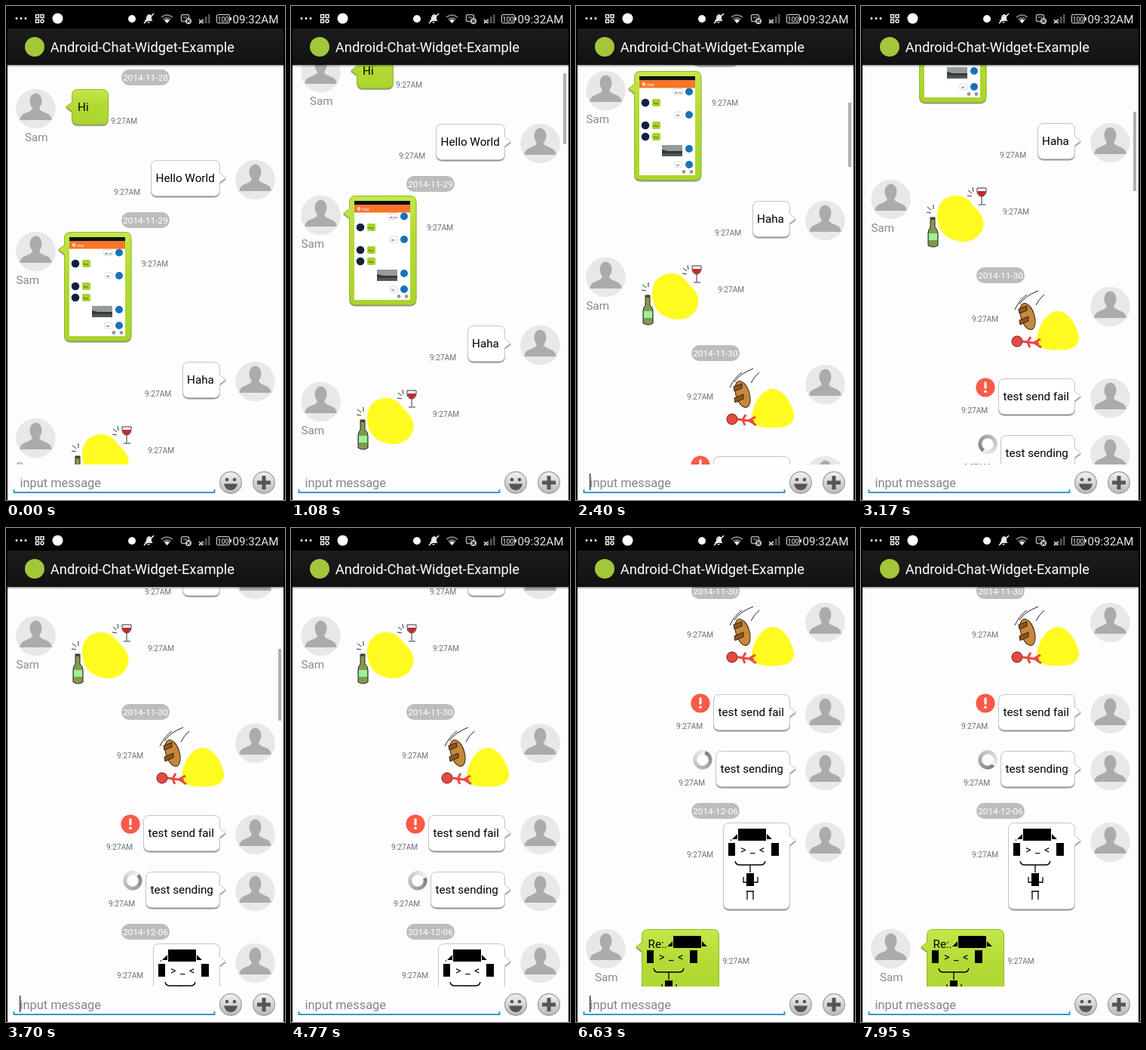
These frames come from a looping animation (370 px wide and 654 px high, 8 s). An HTML page:

```html
<!DOCTYPE html>
<html lang="en">
<head>
<meta charset="utf-8">
<title>Chat list</title>
<style>
html, body { margin: 0; width: 100%; height: 100%; overflow: hidden; background: #000; }
svg { display: block; font-family: Roboto, sans-serif; }
</style>
</head>
<body>
<svg id="stage" width="370" height="654" viewBox="0 0 370 654"></svg>
<script>
const LOOP = 8000;
// The screen refreshes at these moments only.
const STEPS = [0, 280, 540, 810, 1080, 1330, 1610, 1880, 2130, 2400, 2650, 2920, 3170, 3450, 3700, 3970,
  4220, 4500, 4770, 5020, 5270, 5550, 5830, 6080, 6360, 6630, 6900, 7150, 7420, 7700, 7950];
// time, scroll offset, scrollbar top, scrollbar height
const SCROLL = [
  [0, 0, 79, 94], [540, 0, 79, 94], [1610, 96, 99, 93], [2400, 213, 128, 85], [3170, 316, 140, 105],
  [3700, 429, 160, 95], [4770, 429, 160, 95], [5550, 589, 193, 95], [LOOP, 589, 193, 95]
];

const text = (x, y, s, size, fill, extra = '') =>
  `<text x="${x}" y="${y}" font-size="${size}" fill="${fill}" ${extra}>${s}</text>`;
const rect = (x, y, w, h, fill, r = 0) =>
  `<rect x="${x}" y="${y}" width="${w}" height="${h}" rx="${r}" fill="${fill}"/>`;
const circle = (x, y, r, fill, extra = '') => `<circle cx="${x}" cy="${y}" r="${r}" fill="${fill}" ${extra}/>`;
const line = (d, color = '#111', width = 1.2) =>
  `<path d="${d}" fill="none" stroke="${color}" stroke-width="${width}"/>`;
const shape = (d, fill) => `<path d="${d}" fill="${fill}"/>`;
const at = (x, y, body) => `<g transform="translate(${x} ${y})">${body}</g>`;

const date = (y, s) => rect(153, y - 10, 64, 21, '#bdbdbd', 10.5) +
  text(185, y + 4.5, s, 11.8, '#fff', 'text-anchor="middle"');
const stamp = (x, y) => text(x, y + 46, '9:27AM', 10.2, '#68707e');
const label = (x, y, s) => text(x, y + 29, s, 15.25, '#000');
const avatar = (x, y) => at(x, y + 26,
  circle(0, 0, 26.3, '#e8e8e8') +
  '<ellipse cy="-10" rx="8" ry="10.5" fill="#ababab"/>' +
  shape('M-5-4h10v5q2 2 8 4.5q8 2.5 8 9.5H-21q0-7 8-9.5q6-2.5 8-4.5z', '#ababab'));
const mine = y => avatar(330.5, y);
const theirs = (y, nameX) => avatar(39.5, y) + text(nameX, y + 69, 'Sam', 15.2, '#8a8a8a');

function bubble(x, y, w, h, left) {
  const d = `M${x + 8} ${y}H${x + w - 8}q8 0 8 8V${y + 17}l8 6l-8 6V${y + h - 8}q0 8-8 8H${x + 8}q-8 0-8-8V${y + 8}q0-8 8-8z`;
  const flip = left ? `transform="translate(${2 * x + w} 0) scale(-1 1)"` : '';
  const [fill, edge] = left ? ['url(#lime)', '#93b925'] : ['#fff', '#c4c4c4'];
  return `<g ${flip}><path d="${d}" transform="translate(0 1.7)" fill="#8d8d8d" stroke="#aaa" stroke-width=".8"/>
    <path d="${d}" fill="${fill}" stroke="${edge}"/></g>`;
}

// Block-character figure; the hat moves right when a prefix precedes it.
const figure = (x, y, prefix, hatX) => at(x, y,
  text(8.5, 24, prefix, 15.25, '#000') +
  shape(`M${hatX} 22l7-7v7zM${hatX + 8} 8h37v16h-37zM${hatX + 46} 15l7 7h-7z`, '#000') +
  rect(7, 27, 9, 17, '#000') + rect(64, 27, 10, 17, '#000') +
  text(23, 41, '&gt;', 14.5, '#000') + text(36, 40, '_', 14.5, '#000') + text(48, 41, '&lt;', 14.5, '#000') +
  line('M16 51q1 5 6 5h28q5 0 6-5M36 56v10M27 72v7h19v-7M32 102v-11h8v11M31 91h10', '#000', 1.3) +
  rect(31, 67, 10, 17, '#000'));

function miniScreen(x, y) {
  const reply = (cy, w) => circle(66, cy, 5, '#1673b8') +
    `<rect x="${57 - w}" y="${cy - 4}" width="${w}" height="8" rx="2" fill="#fff" stroke="#ccc" stroke-width=".7"/>` +
    text(59 - w, cy + 2, w > 11 ? 'ok so' : 'ok', 4, '#333');
  const note = cy => circle(8, cy, 5.3, '#14203f') + rect(17, cy - 5, 11, 10, '#a8d32c', 2) + text(19, cy + 2, 'hey', 4, '#333');
  return at(x, y, rect(0, 0, 74, 131, '#fff') + rect(0, 0, 74, 5.5, '#111') + rect(0, 5.5, 74, 10, '#ff7426') +
    circle(6, 10.5, 2.4, '#ffd6b5') + text(10, 12.5, 'chat', 5, '#fff') +
    reply(20.5, 12) + note(35) + reply(51, 10) + note(65) + note(80) + reply(117, 10) +
    rect(30, 91, 27, 15, '#939b9d') + shape('M30 97l8 2h19v3H30z', '#343b3a') + rect(30, 102, 27, 4, '#555') +
    circle(66, 96, 5, '#1673b8') + circle(59, 126.5, 2.4, '#999') + circle(69, 126.5, 2.4, '#999'));
}

const drinkSticker = (x, y) => at(x, y,
  shape('M15 36C16 22 25 13 39 12C52 11 59 20 64 27C75 36 80 47 74 59C67 72 52 76 38 71C23 67 14 54 15 36z', '#fffb21') +
  '<path d="M6 41h6v13q4 3 4 8v16q-6 4-13 0v-16q0-5 3-8z" fill="#82994c" stroke="#222"/>' +
  rect(4, 62, 11, 9, '#9df09a') + rect(6.5, 41, 5, 3, '#5c3a25') +
  '<path d="M68 2h12q1 11-6 11q-7 0-6-11z" fill="#fff" stroke="#333"/>' +
  shape('M68.5 6h11q-1 7-5.5 7t-5.5-7z', '#c6282d') +
  line('M74 13v10M70 24h9M56 5l5 4M55 12l6 1M62 1l1 6M2 27l5 4M1 34l6 1M10 24v6', '#333', 1));

const stoolSticker = (x, y) => at(x, y,
  shape('M34 62C36 42 48 24 62 24C76 24 88 44 90 58C91 70 80 76 62 75.5C46 75.5 34 73 34 62z', '#fffb21') +
  '<g stroke="#3b220e"><ellipse cx="22" cy="31" rx="9" ry="18" transform="rotate(-17 22 31)" fill="#c6883c"/>' +
  '<path d="M10 21l11-4v6l-10 4zM11 36l12-5v6l-11 5z" fill="#8b5524"/></g>' +
  line('M5 22Q11 9 21 2M11 15Q18 4 36 -3M33 16Q37 8 44 2', '#222', 1) +
  circle(8, 64, 7, '#e54a42', 'stroke="#6b1714"') +
  line('M15 64L37 67M22 65l4-7M22 65l3 7M30 66l9-5M31 66l9 6', '#e54a42', 3));

const alertIcon = (x, y) => circle(x, y, 12.6, '#fb5a48') +
  rect(x - 1.6, y - 7.5, 3.2, 9, '#fff', 1) + circle(x, y + 5.3, 1.9, '#fff');

function spinner() {
  let arcs = '';
  for (let i = 0; i < 24; i++) {
    const shade = 125 + i * 5;
    arcs += `<path d="M0-10A10 10 0 0 1 2.9-9.57" fill="none" stroke="rgb(${shade},${shade},${shade})" stroke-width="4.6" transform="rotate(${i * 15})"/>`;
  }
  return at(168, 896, circle(0, 0, 12.5, 'none', 'stroke="#bbb" stroke-width=".7"') + `<g id="spinner">${arcs}</g>`);
}

const list =
  date(94, '2014-11-28') +
  theirs(110, 25) + bubble(87.5, 110.5, 48, 46.5, true) + label(95, 110, 'Hi') + stamp(139, 110) +
  mine(204) + bubble(192.5, 204.5, 91, 47, false) + label(198.5, 204, 'Hello World') + stamp(143, 204) +
  date(283, '2014-11-29') +
  theirs(299, 13.5) + bubble(77.5, 299.5, 88.5, 144, true) + miniScreen(84, 306) + stamp(180, 299) +
  mine(471) + bubble(234.5, 471.5, 49, 47, false) + label(240, 471, 'Haha') + stamp(184, 471) +
  theirs(546, 13.5) + drinkSticker(86, 555) + stamp(188, 546) +
  date(672, '2014-11-30') +
  mine(688) + stoolSticker(199, 696) + stamp(147, 688) +
  mine(809) + bubble(182.5, 809.5, 101, 47, false) + label(188.5, 809, 'test send fail') +
  alertIcon(165, 821) + stamp(133, 809) +
  mine(884) + bubble(185.5, 884.5, 98, 47, false) + label(191.5, 884, 'test sending') + spinner() + stamp(136, 884) +
  date(963, '2014-12-06') +
  mine(979) + bubble(195.5, 979.5, 88, 114, false) + figure(195, 979, '.', 12) + stamp(147, 979) +
  theirs(1120, 25) + bubble(87.5, 1120.5, 102, 114, true) + figure(87, 1121, 'Re:.', 34) + stamp(194.5, 1120);

const statusBar =
  [14, 20, 26].map(x => circle(x, 16.5, 1.4, '#fff')).join('') +
  '<g fill="none" stroke="#fff" stroke-width="1.4"><rect x="39.5" y="11.5" width="4" height="4"/><rect x="46" y="11.5" width="4" height="4"/><rect x="39.5" y="18" width="4" height="4"/><circle cx="48" cy="20" r="2"/></g>' +
  circle(68.5, 16.5, 7, '#fff') + circle(167, 17, 5, '#fff') +
  shape('M183 20q3-1 3-5q1-4 4-4q3 0 3 5q0 3 2 4zM187 21h4l-2 2z', '#ddd') + line('M183 23L196 10', '#fff', 1.5) +
  line('M206 15q7-6 15 0M208.5 18q5-4 10 0', '#777', 2) + shape('M210 19q3.5-3 7 0l-3.5 4z', '#eee') +
  '<rect x="232.5" y="11.5" width="10" height="9" rx="2" fill="none" stroke="#aaa" stroke-width="1.5"/>' +
  line('M235 15h5', '#aaa') + circle(242, 20, 4, '#ccc') + line('M240 18l4 4m0-4l-4 4', '#222') +
  [0, 1, 2, 3].map(i => rect(256 + i * 4, 20 - i * 3, 2.6, 3 + i * 3, '#555')).join('') +
  line('M256 18l5 5m0-5l-5 5', '#ddd', 1.3) +
  '<rect x="279.5" y="11.5" width="17" height="11" rx="1.5" fill="none" stroke="#ddd"/>' +
  rect(297, 15, 2, 4, '#ddd') + text(288, 20.5, '100', 9, '#fff', 'text-anchor="middle"') +
  text(300.5, 22.5, '09:32AM', 15.2, '#e8e8e8');

const button = (x, icon) => at(x, 631,
  circle(0, 0, 14.4, 'url(#metal)', 'stroke="#9b9b9b" stroke-width="1.2"') + icon);

const inputBar =
  rect(2, 607, 366, 47, '#fdfdfd') +
  text(18.5, 636.5, 'input message', 16.4, '#858585') +
  `<g id="cursor">${rect(18, 619, 1.3, 22, '#222')}</g>` +
  line('M10.5 640v4H276.500V640', '#2f9cc9', 2) +
  button(298, circle(-5, -4, 2.3, '#555') + circle(5, -4, 2.3, '#555') + shape('M-9 1.5H9Q7 10 0 10T-9 1.5z', '#555')) +
  button(342, shape('M-2.5-9h5v6.5H9v5H2.5V9h-5V2.5H-9v-5h6.5z', '#555'));

const stage = document.getElementById('stage');
stage.innerHTML = `<defs>
  <linearGradient id="lime" x2="0" y2="1"><stop stop-color="#c3e84a"/><stop offset=".4" stop-color="#b3da35"/><stop offset="1" stop-color="#abd42d"/></linearGradient>
  <linearGradient id="bar" x2="0" y2="1"><stop stop-color="#1c1c1c"/><stop offset="1" stop-color="#111"/></linearGradient>
  <linearGradient id="shade" x2="0" y2="1"><stop stop-opacity=".4"/><stop offset="1" stop-opacity="0"/></linearGradient>
  <linearGradient id="metal" x2="0" y2="1"><stop stop-color="#f2f2f2"/><stop offset="1" stop-color="#b8b8b8"/></linearGradient>
  <clipPath id="window"><rect x="2" y="78" width="366" height="529"/></clipPath></defs>` +
  rect(0, 0, 370, 654, '#000') + rect(2, 78, 366, 576, '#fdfdfd') +
  `<g clip-path="url(#window)"><g id="list">${list}</g></g>` +
  '<rect id="scrollbar" x="361" width="4" fill="#b0b0b0"/>' +
  rect(2, 30, 366, 48, 'url(#bar)') + rect(2, 78, 366, 3, 'url(#shade)') +
  circle(38, 54, 13, '#a4c639') + text(58.8, 61, 'Android-Chat-Widget-Example', 18.35, '#fff') +
  statusBar + inputBar;

const [listNode, barNode, spinnerNode, cursorNode] =
  ['list', 'scrollbar', 'spinner', 'cursor'].map(id => document.getElementById(id));

function scrollState(t) {
  const i = SCROLL.findIndex(key => key[0] > t);
  const a = SCROLL[i - 1], b = SCROLL[i];
  const k = (t - a[0]) / (b[0] - a[0]);
  return a.map((v, j) => v + (b[j] - v) * k);
}

function barOpacity(t) {
  if ((t > 540 && t <= 3700) || (t > 4770 && t <= 5550)) return 1;
  return t === 3970 || t === 5830 ? 0.5 : 0;
}

function draw(now) {
  const clock = now % LOOP;
  const t = STEPS.filter(s => s <= clock).pop() || 0;
  const [, offset, top, height] = scrollState(t);
  listNode.setAttribute('transform', `translate(0 ${-Math.round(offset)})`);
  barNode.setAttribute('y', top);
  barNode.setAttribute('height', height);
  barNode.setAttribute('opacity', barOpacity(t));
  spinnerNode.setAttribute('transform', `rotate(${(t * 0.36 + 150) % 360})`);
  cursorNode.setAttribute('opacity', t % 1000 >= 250 && t % 1000 < 750 ? 1 : 0);
  requestAnimationFrame(draw);
}
draw(performance.now());
</script>
</body>
</html>
```
